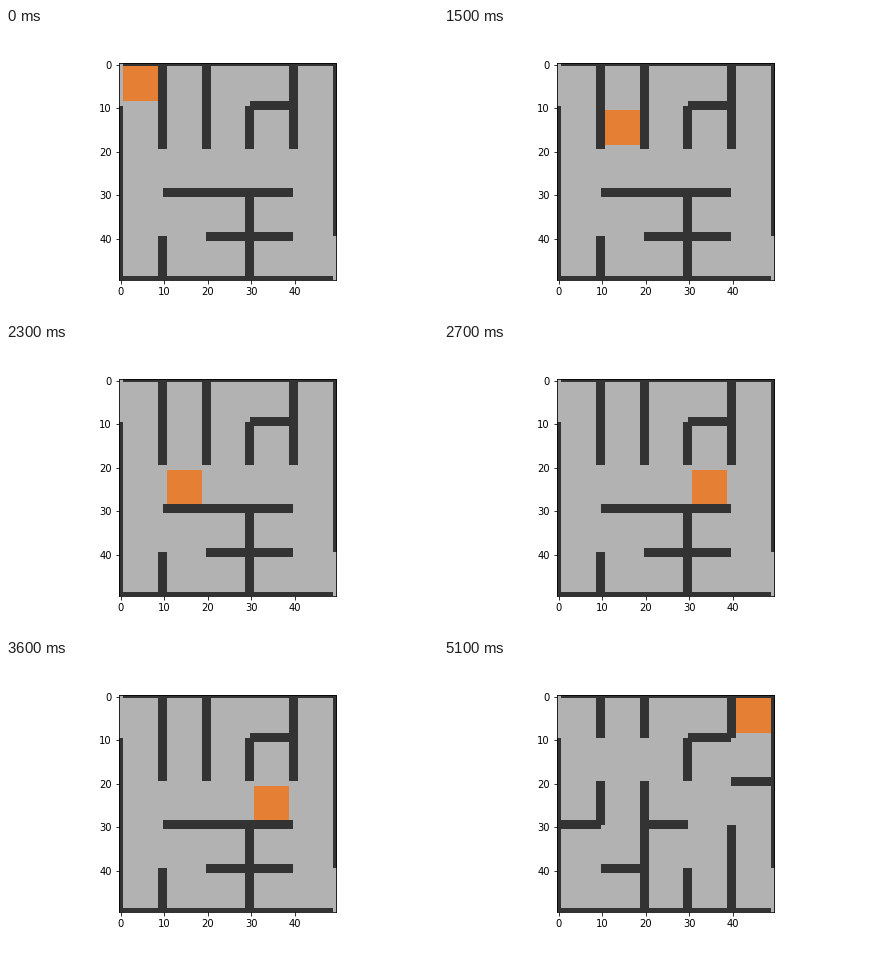
These frames come from a looping animation (432 px wide and 288 px high, 8 s). A matplotlib script:

```python
import numpy as np
import matplotlib.pyplot as plt
from matplotlib.animation import FuncAnimation

CELLS, UNIT = 5, 10
SIZE = CELLS * UNIT
STEP_MS, FRAMES = 100, 80
FLOOR, WALL, AGENT = 0.7, 0.2, (0.9, 0.5, 0.2)


def down(grid, x, top, bottom):
    grid[top * UNIT:bottom * UNIT, x * UNIT - 1:x * UNIT + 1] = WALL


def across(grid, y, left, right):
    down(grid.swapaxes(0, 1), y, left, right)


def shared_walls():
    """Outer frame with entrance and exit, plus walls both mazes have."""
    grid = np.full((SIZE, SIZE, 3), FLOOR)
    grid[[0, -1], :] = WALL
    grid[:, [0, -1]] = WALL
    grid[:UNIT, 0] = FLOOR
    grid[-UNIT:, -1] = FLOOR
    for x in (1, 2, 4):
        down(grid, x, 0, 1)
    down(grid, 3, 1, 2)
    down(grid, 3, 4, 5)
    across(grid, 1, 3, 4)
    return grid


def first_maze():
    grid = shared_walls()
    for x in (1, 2, 4):
        down(grid, x, 1, 2)
    down(grid, 3, 3, 4)
    down(grid, 1, 4, 5)
    across(grid, 3, 1, 4)
    across(grid, 4, 2, 4)
    return grid


def second_maze():
    grid = shared_walls()
    down(grid, 1, 2, 3)
    down(grid, 2, 2, 5)
    down(grid, 4, 3, 5)
    across(grid, 2, 4, 5)
    across(grid, 3, 0, 1)
    across(grid, 3, 2, 3)
    across(grid, 4, 1, 2)
    return grid


def neighbours(grid, cell):
    row, col = cell
    for dr, dc in ((1, 0), (0, 1), (-1, 0), (0, -1)):
        r, c = row + dr, col + dc
        if 0 <= r < CELLS and 0 <= c < CELLS:
            border = grid[(row + r + 1) * UNIT // 2, (col + c + 1) * UNIT // 2]
            if border[0] != WALL:
                yield r, c


def shortest_path(grid, start, goal):
    """Breadth-first search; returns the cells after start, up to goal."""
    queue, paths = [start], {start: []}
    for cell in queue:
        if cell == goal:
            return paths[cell]
        for nxt in neighbours(grid, cell):
            if nxt not in paths:
                paths[nxt] = paths[cell] + [nxt]
                queue.append(nxt)


# Step at which the agent sets off -> goals it visits without pausing.
TRIPS = {
    11: [(1, 0)],
    13: [(1, 1)],
    17: [(2, 1), (1, 1)],
    21: [(0, 1), (2, 0), (2, 4), (1, 3)],
    36: [(2, 4)],
    42: [(1, 4)],
    47: [(3, 4)],
    50: [(4, 4)],
}
MAZE_CHANGE = 51


def walk(grid, cell):
    """The agent's cell on every step until the maze changes."""
    track = []
    for start, goals in TRIPS.items():
        track += [cell] * (start - len(track))
        for goal in goals:
            track += shortest_path(grid, cell, goal)
            cell = goal
    return track


FIRST, SECOND = first_maze(), second_maze()
TRACK = walk(FIRST, (0, 0))


def scene(step):
    if step < MAZE_CHANGE:
        grid, (row, col) = FIRST.copy(), TRACK[step]
    else:
        grid, (row, col) = SECOND.copy(), (0, CELLS - 1)
    y, x = row * UNIT, col * UNIT
    grid[y + 1:y + UNIT - 1, x + 1:x + UNIT - 1] = AGENT
    return grid


fig, ax = plt.subplots(figsize=(6, 4), dpi=72)
fig.subplots_adjust(left=0.125, right=0.9, bottom=0.125, top=0.88)
image = ax.imshow(scene(0), interpolation="nearest")


def update(step):
    image.set_data(scene(step))
    return [image]


anim = FuncAnimation(fig, update, frames=FRAMES, interval=STEP_MS,
                     repeat=True, repeat_delay=0)
plt.show()
```
